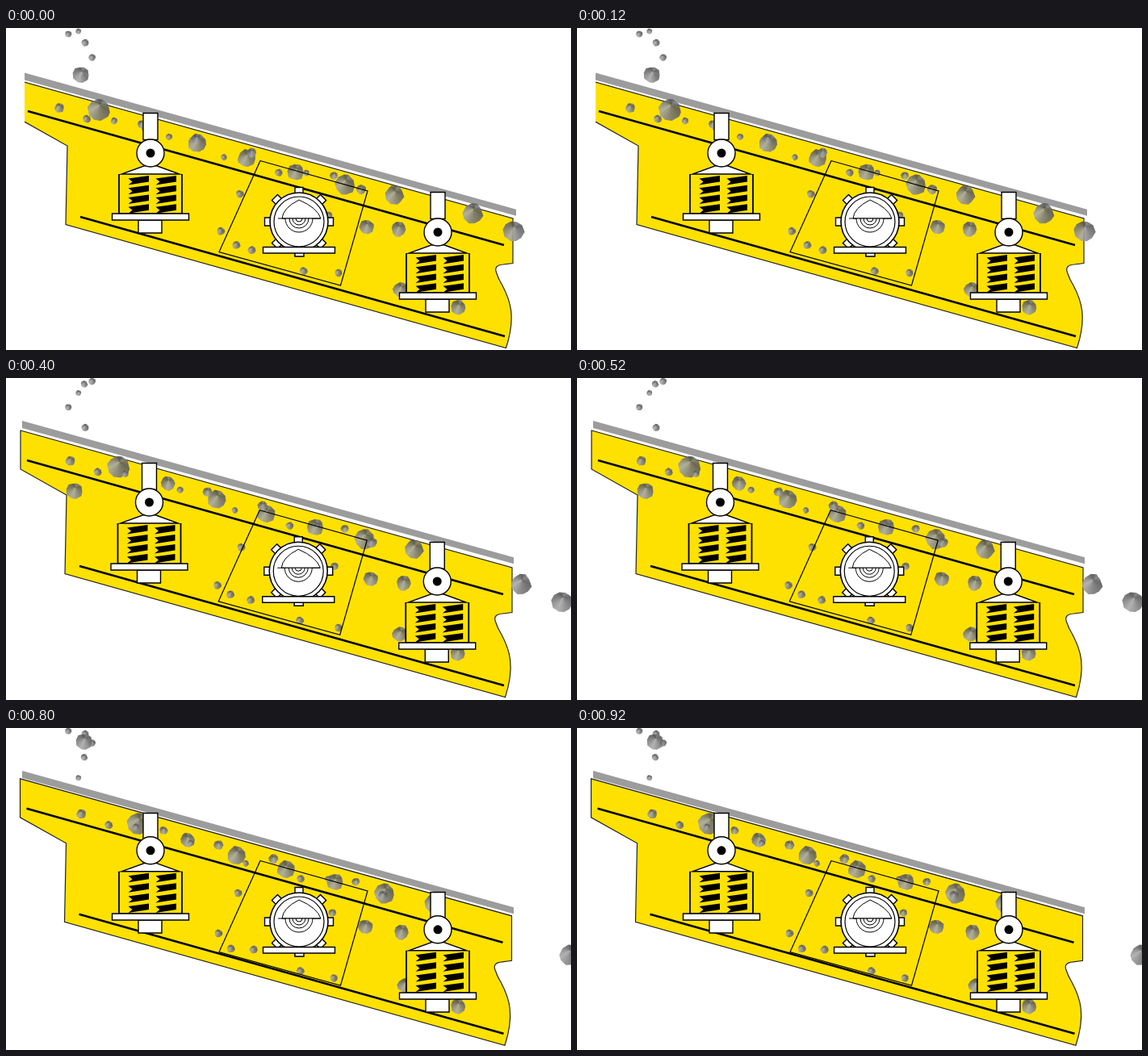
Recreate the animation shown at these times as an HTML page with a canvas. Size 700x399 px, loop 1000 ms.

```html
<!DOCTYPE html>
<html lang="en">
<head>
<meta charset="utf-8">
<title>Vibrating screen</title>
<style>
html, body { margin: 0; width: 100%; height: 100%; overflow: hidden; background: #fff; }
canvas { display: block; }
</style>
</head>
<body>
<canvas id="stage" width="700" height="399"></canvas>
<script>
const ctx = document.getElementById("stage").getContext("2d");
const YELLOW = "#ffe100", STEP = 200, SLOPE = 0.278;

// Shake of the body (dx, dy), of the mounts (base) and of the deck (left, top); edge crops the body
const poses = [
  { dx: 0, dy: 0, base: 0, left: 23, top: 55.5, edge: 23 },
  { dx: -1, dy: -2.7, base: 0.5, left: 20, top: 53, edge: 0 },
  { dx: -1, dy: -1, base: -1.5, left: 20, top: 53, edge: 0 },
  { dx: 1, dy: -7.2, base: 0, left: 21, top: 47.5, edge: 0 },
  { dx: -1.5, dy: -3.2, base: 0, left: 20, top: 53, edge: 0 }
];

// Where sieved stones gather below the deck
const sieved = [[287, 208], [262, 254], [283, 270], [302, 273], [367, 303], [408, 307],
  [402, 230], [450, 248], [489, 252], [490, 321], [522, 329], [563, 344]];

function rand(n) {
  const v = Math.sin(n * 127.1 + 3.7) * 43758.5453;
  return v - Math.floor(v);
}
function spread(n, width) { return (rand(n) - 0.5) * width; }

function paint(shape, fill, line, width = 1.4) {
  if (fill) { ctx.fillStyle = fill; ctx.fill(shape); }
  if (line) { ctx.strokeStyle = line; ctx.lineWidth = width; ctx.stroke(shape); }
}
function draw(d, fill, line, width) { paint(new Path2D(d), fill, line, width); }
function box(x, y, w, h) { draw(`M${x} ${y}h${w}v${h}h${-w}z`, "#fff", "#000"); }
function disc(x, y, r, fill, line, width) {
  const p = new Path2D();
  p.arc(x, y, r, 0, 2 * Math.PI);
  paint(p, fill, line, width);
}
function shifted(x, y, fn) {
  ctx.save();
  ctx.translate(x, y);
  fn();
  ctx.restore();
}

function drawDeck(left, top) {
  draw(`M${left} ${top}l609 ${609 * SLOPE}v8l-609 ${-609 * SLOPE + 1}z`, "#9c9c9c");
}

function drawBody() {
  draw("M19 66V114L76 146L74 243.5L619.5 396.5C632 358 625 338 615 319" +
    "Q610 311 607.5 303Q604 294 616 293L628 291.5V236Z", YELLOW, "#222", 1.2);
  draw("M27 103L617 269M92 234L618 382", null, "#000", 2.6);
}

function drawStone(id, x, y, r) {
  const p = new Path2D();
  for (let i = 0; i < 10; i++) {
    const a = (i + rand(id + i) * 0.4) * Math.PI / 5;
    const d = r * (0.9 + rand(id * 3 + i) * 0.16);
    p.lineTo(x + d * Math.cos(a), y + d * Math.sin(a));
  }
  p.closePath();
  const fill = ctx.createConicGradient(0.6 + rand(id), x + r * 0.1, y - r * 0.4);
  [120, 170, 115, 80, 125, 90, 120].forEach((v, i) =>
    fill.addColorStop(i / 6, `rgb(${v},${v},${v})`));
  ctx.globalAlpha = 0.9;
  paint(p, fill);
  ctx.globalAlpha = 1;
}

function drawFalling(step) {
  for (let i = 0; i < 5; i++) {
    const u = (i + step) % 5 / 5;
    drawStone(i, 62 + 45 * rand(i + 9), 4 + 90 * u * u, 3.5 + 1.5 * rand(i));
  }
  const drop = (step + 1) % 5;
  drawStone(7, 97 - 4 * drop, 17 + 41 * drop, 10.5);
}

// Stones ride down the deck and sink a little in its middle
function drawRiding(step) {
  for (let i = 0; i < 7; i++) {
    const x = 115 + 61 * (i + step / 5);
    const sink = 69 + 10 * Math.sin(Math.PI * (x - 115) / 430);
    drawStone(i + 20, x, x * SLOPE + sink, 9 + 5 * rand(i + 20));
  }
  for (let i = 0; i < 12; i++) {
    const x = 66 + 34 * (i + step / 5);
    drawStone(i + 40, x, x * SLOPE + 79 + spread(i + 40, 18), 4 + 2.5 * rand(i + 41));
  }
}

function drawSieved(step) {
  sieved.forEach(([x, y], i) => {
    const id = i + 60 + step * 20;
    drawStone(i + 60, x + spread(id, 10), y + spread(id + 7, 8), x < 430 ? 5 : 9.5);
  });
}

function drawLeaving(step) {
  for (const start of [578, 629]) {
    const x = start + 30 * step;
    drawStone(start, x, x * 0.43 - 19, 13);
  }
}

function drawMount(rise) {
  const top = 181 + rise, pitch = (228 - top) / 4;
  draw(`M140 ${top}V230H218V${top}`, YELLOW, "#000", 1.8);
  for (const x of [151.5, 185.5])
    for (let i = 0; i < 4; i++)
      draw(`M${x} ${top + 5.5 + i * pitch}l25.5 -3.5v7.5l-25.5 4l5 -4z`, "#000");
  draw(`M179 ${top - 13}L215 ${top}H143Z`, "#fff", "#000");
  box(170, 105.5, 18, 33);
  disc(179, 155 + rise, 17, "#fff", "#000");
  disc(179, 155 + rise, 5.5, "#000");
  box(164, 238, 29, 16);
  box(131.5, 230, 95, 8);
}

function drawMotor() {
  draw("M315 164.5L448 202L414.5 319L264 277.5Z", null, "#000", 1.2);
  for (let i = 0; i < 8; i++)
    shifted(363, 240, () => {
      ctx.rotate(i * Math.PI / 4);
      box(34, -5, 8.5, 10);
    });
  disc(363, 240, 36, "#fff", "#000", 1.6);
  disc(363, 240, 31, "#fff", "#000", 1.2);
  draw("M342 236Q343 223 363 213Q386 223 390 236Z", "#fff", "#000", 1);
  for (const r of [17, 12, 8, 4])
    draw(`M${363 - r} 236A${r} ${r} 0 0 0 ${363 + r} 236`, "#fff", "#000", 1);
  draw("M337 236H390", null, "#000", 1.2);
  box(358, 278, 11, 5);
  box(318.5, 271.5, 89, 7.5);
}

function render(time) {
  const step = Math.floor(time / STEP) % poses.length;
  const { dx, dy, base, left, top, edge } = poses[step];
  ctx.fillStyle = "#fff";
  ctx.fillRect(0, 0, 700, 399);
  drawDeck(left, top);
  ctx.save();
  ctx.beginPath();
  ctx.rect(edge, 0, 700, 399);
  ctx.clip();
  shifted(dx, dy, drawBody);
  ctx.restore();
  for (const stones of [drawFalling, drawRiding, drawSieved, drawLeaving]) stones(step);
  shifted(base, 0, () => drawMount(dy));
  shifted(356 + base / 2, 98, () => drawMount(dy));
  shifted(base / 2, base / 2, drawMotor);
}

const start = performance.now();
function tick() {
  render(performance.now() - start);
  requestAnimationFrame(tick);
}
tick();
</script>
</body>
</html>
```
